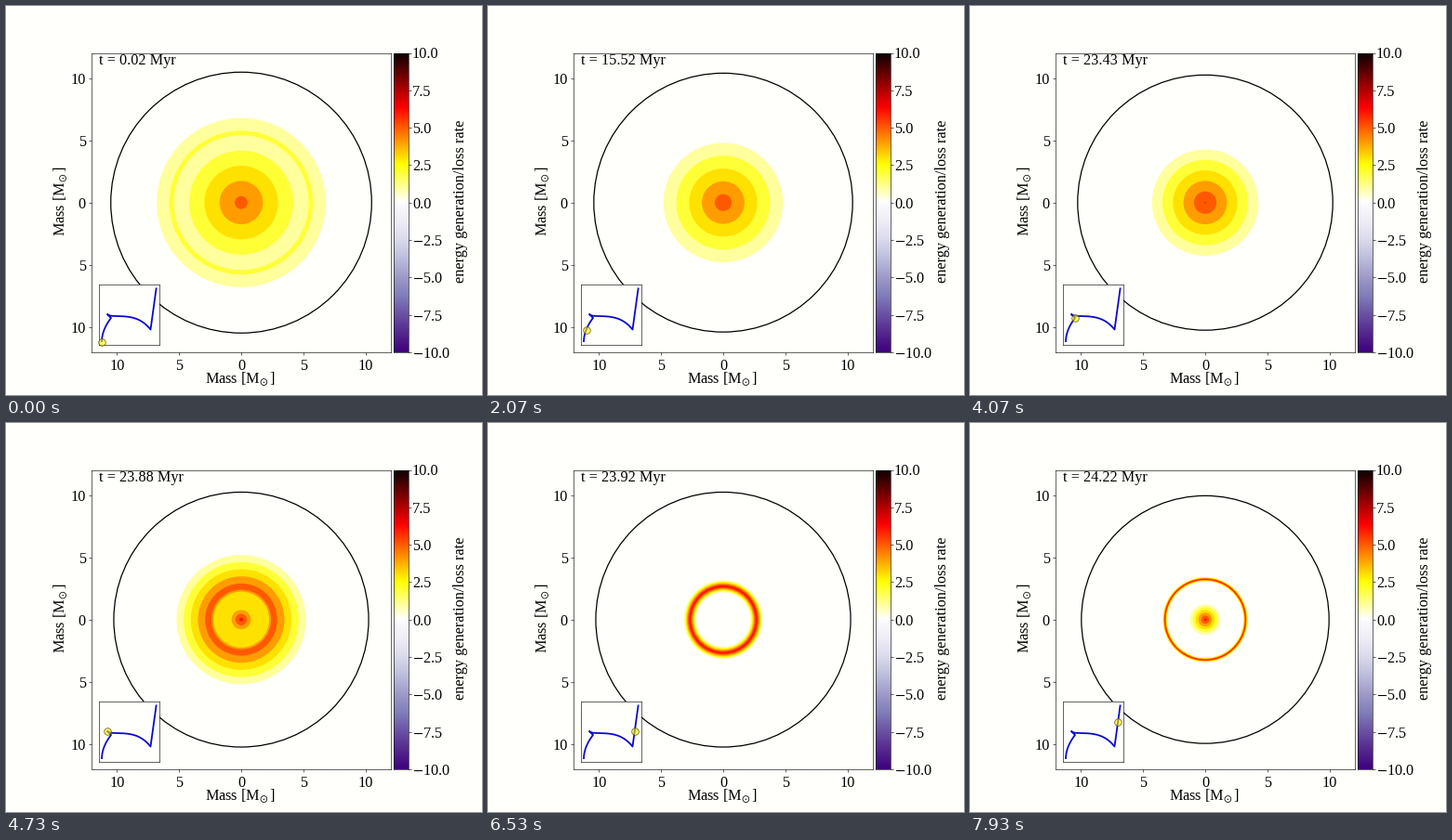
Write a matplotlib script that moves like this. It is 512x419 px and loops after 8000 ms.

```python
import numpy as np
import matplotlib.pyplot as plt
from matplotlib.animation import FuncAnimation
from matplotlib.colors import ListedColormap
from matplotlib.patches import Circle

W, H, DPI = 512, 419, 64
LOOP, FRAMES, STEPS = 8000, 160, 120
PAPER = "#fffffb"
LEVELS = range(1, 7)


def px(n):
    """Pixels to points."""
    return n * 72 / DPI


plt.rcParams.update({
    "font.family": "Liberation Serif",
    "font.size": px(16.3),
    "mathtext.fontset": "stix",
    "axes.linewidth": px(0.6),
    "axes.facecolor": PAPER,
})

# Energy scale: purple for losses, hot colours for generation.
hot = plt.get_cmap("hot_r")
ramp = np.linspace(0, 1, 256)
energy = ListedColormap(
    np.vstack([plt.get_cmap("Purples_r")(ramp), hot(ramp)]))


def age(k):
    """Myr: steady at first, then ever shorter steps, a leap at the end."""
    if k <= 31:
        return 0.02 + 0.5 * k
    if k <= 75:
        return 23.9 - 8.38 * ((75 - k) / 44) ** 2.525
    return 23.9 + 0.03 * (k - 75) / 35 + 0.282 * max(0, k - 110) / 9


def mass(k):
    t = age(k)
    return 10.49 - 0.24 * min(1, t / 23.9) ** 2.5 - max(0, t - 23.93)


def burning(k):
    """Radii of the outer discs, the hole inside the shell and the core."""
    keys = [0, 31, 50, 67, 71, 86, 110, 119]
    size = np.interp(k, keys, [5.4, 4.8, 4.05, 4.4, 5.2, 3.35, 2.96, 3.43])
    gap = np.interp(k, keys, [1.22, 1.03, 0.83, 0.85, 0.575, 0.12, 0.039, 0.032])
    inner = np.interp(k, keys[4:], [1.8, 1.9, 2.49, 3.05])
    centre = np.interp(k, [71, 75, 103, 110, 119], [1.7, 0, 0, 0.75, 1.22])
    floor = np.clip(round(3 - 0.75 * (k - 71)), 0, 6)  # level inside the shell

    outer = [max(0, size - (n - 1) * gap) for n in LEVELS]
    hole = [(inner + (n - 1) * min(gap, 0.15)) * (n > floor) for n in LEVELS]
    core = [centre * (1 - (n - 1) / 5.5) * (n > floor) for n in LEVELS]
    return outer, hole, core


def track(p):
    """Inset curve: 0-1 rise, 1-2 hook, 2-3 crossing, 3-4 climb."""
    s = p % 1 if p < 4 else 1
    if p < 1:
        return 103 + 10 * s ** 2, 362 - 26 * s
    if p < 2:
        return 113 - 4 * s, 336 - 4 * s
    if p < 3:
        return 109 + 46.5 * s, 334 + 14.5 * s ** 4 - 2 * (1 - s) ** 20
    return 155.5 + 6.2 * s, 348.5 - 45 * s


def progress(k):
    return np.interp(k, [0, 60, 71, 86, 95, 103, 110, 119],
                     [0, 1, 2, 2.54, 3, 4, 3.68, 3.59])


fig = plt.figure(figsize=(W / DPI, H / DPI), dpi=DPI, facecolor=PAPER)


def panel(x0, y0, x1, y1):
    return fig.add_axes([x0 / W, 1 - y1 / H, (x1 - x0) / W, (y1 - y0) / H])


def label(x, y, text, **kw):
    return fig.text(x / W, 1 - y / H, text, **kw)


# Star
ax = panel(92, 50.5, 414, 373)
half = 12.04
ax.set(xlim=(-half, half), ylim=(-half, half))
ticks = [-10, -5, 0, 5, 10]
names = [str(abs(v)) for v in ticks]
ax.set_xticks(ticks, names)
ax.set_yticks(ticks, names)
ax.tick_params(length=px(3), width=px(0.6))
ax.tick_params(axis="x", pad=px(4))
ax.tick_params(axis="y", pad=px(3))


def disc(level, z):
    color = hot(level / 10) if level else PAPER
    return ax.add_patch(Circle((0, 0), 0, fc=color, lw=0, zorder=z))


outer = [disc(n, 1 + n / 10) for n in LEVELS]
ring = [disc(2, 1.12), disc(1, 1.14)]
hole = [disc(n - 1, 3 - n / 10) for n in LEVELS]
core = [disc(n, 3 + n / 10) for n in LEVELS]
edge = ax.add_patch(Circle((0, 0), 10, fill=False, ec="black",
                           lw=px(1.25), zorder=5))

title = r"Mass [M$_{\!\odot}$]"
label(252.5, 406, title, ha="center", va="baseline")
label(58.5, 210, title, ha="center", va="center", rotation=90)
clock = label(100, 63, "", va="baseline")

# Colour scale
bar = panel(417, 50.5, 433, 373)
bar.imshow(np.linspace(-10, 10, 512)[:, None], cmap=energy, origin="lower",
           extent=(0, 1, -10, 10), aspect="auto")
values = np.linspace(-10, 10, 9)
bar.set_xticks([])
bar.set_yticks(values, [("$-$" if v < 0 else "") + f"{abs(v):.1f}"
                        for v in values])
bar.yaxis.tick_right()
bar.tick_params(length=px(3), width=px(0.6), pad=px(1))
label(489, 210, "energy generation/loss rate",
      ha="center", va="center", rotation=90)

# Inset track
inset = panel(100, 300, 164.5, 365)
inset.set(xlim=(100, 164.5), ylim=(365, 300), xticks=[], yticks=[])
inset.plot(*zip(*map(track, np.linspace(0, 4, 161))), color="#0a0ac8",
           lw=px(1.8), solid_capstyle="butt")
dot, = inset.plot([], [], "o", ms=px(7.6), mfc=(1, 0.95, 0, 0.6),
                  mec=(0.35, 0.33, 0, 0.85), mew=px(0.8), clip_on=False,
                  zorder=6)


def draw(i):
    # The picture advances 15 times a second.
    k = min((i + 1) * STEPS // FRAMES, STEPS - 1)
    for group, radii in zip((outer, hole, core), burning(k)):
        for c, r in zip(group, radii):
            c.set_radius(r)

    # A short-lived halo and thin ring around the young star
    young = max(0, 1 - k / 3)
    outer[0].set_radius(outer[0].get_radius() + 1.4 * young)
    ring[0].set_radius(5.78 * (young > 0))
    ring[1].set_radius((5.78 - 0.36 * young) * (young > 0))

    edge.set_radius(mass(k))
    clock.set_text(f"t = {age(k):.2f} Myr")
    x, y = track(progress(k))
    dot.set_data([x], [y])
    return [*outer, *ring, *hole, *core, edge, clock, dot]


anim = FuncAnimation(fig, draw, frames=FRAMES, interval=LOOP // FRAMES,
                     repeat=True, repeat_delay=0, blit=False)
plt.show()
```
